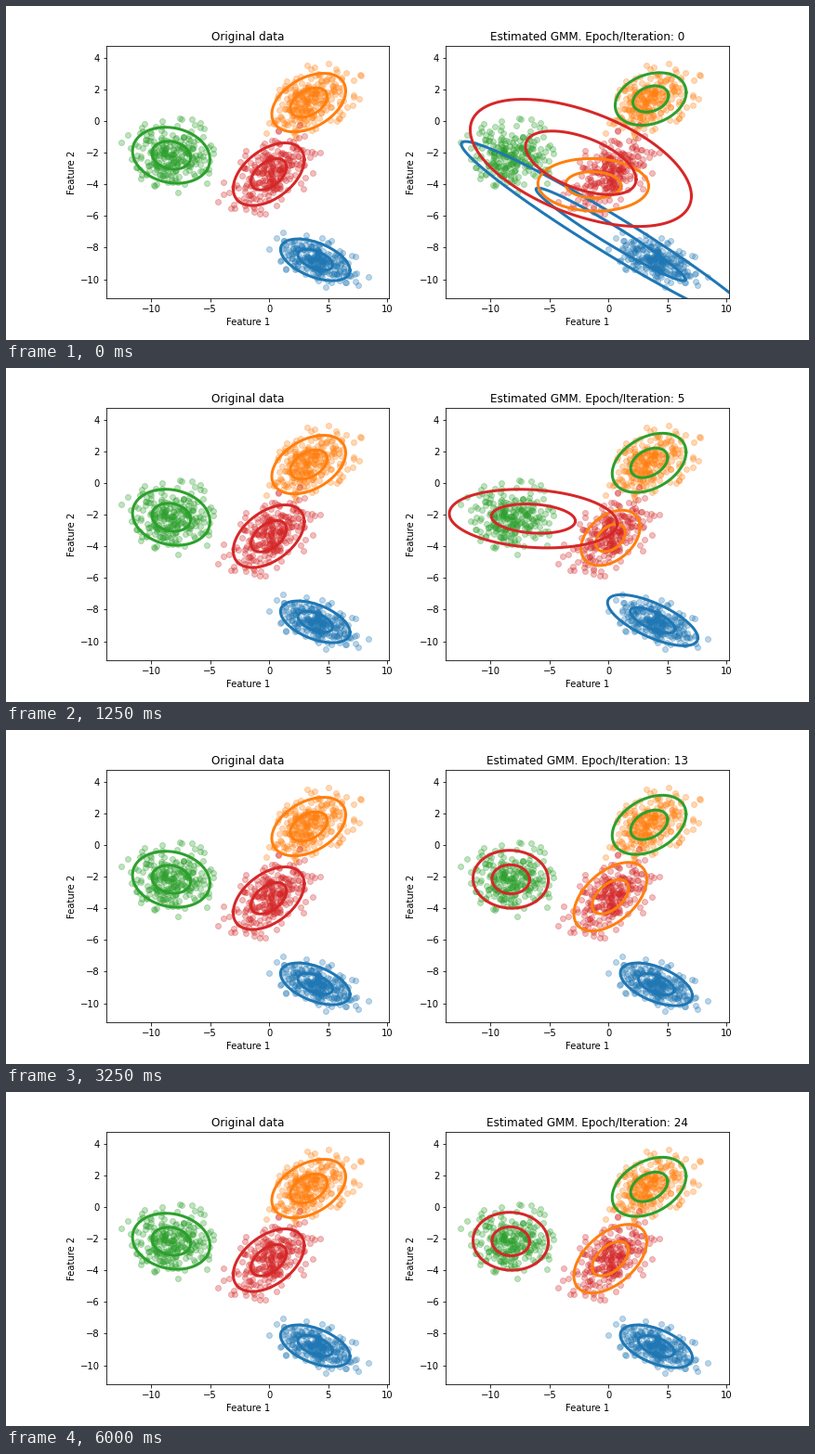
Recreate the animation shown at these times as a matplotlib script. Size 864 px wide and 360 px high, loop 6.25 s.

```python
import numpy as np
import matplotlib.pyplot as plt
from matplotlib.animation import FuncAnimation

plt.rcParams.update({"font.family": "DejaVu Sans", "font.size": 10})

EPOCHS, STEP_MS = 25, 250
XLIM, YLIM = (-13.795, 10.17), (-11.198, 4.742)
COLORS = ["C0", "C1", "C2", "C3"]
SAMPLES, MAX_SIGMA = 250, 2.9
THETA = np.linspace(0, 2 * np.pi, 241)


def gauss(cx, cy, hx, hy, rho):
    """Pose of a gaussian: centre, 2-sigma width, slant and thickness."""
    return np.array([cx, cy, hx, hy * rho, hy * np.sqrt(1 - rho**2)])


def project(pose, u, v):
    """Map unit-circle coordinates onto the 2-sigma ellipse."""
    cx, cy, hx, slant, thick = pose
    return cx + hx * u, cy + slant * u + thick * v


TRUE = [
    gauss(3.90, -8.77, 2.94, 1.32, -0.50),
    gauss(3.35, 1.17, 3.13, 1.85, 0.40),
    gauss(-8.30, -2.16, 3.28, 1.77, -0.15),
    gauss(-0.04, -3.36, 3.01, 1.98, 0.46),
]

# Initial guesses, the pauses on the way, and the converged fits
BLUE_START = gauss(0.18, -7.16, 12.67, 5.87, -0.972)
BLUE_END = gauss(4.04, -8.80, 3.05, 1.35, -0.53)
ORANGE_START = gauss(-1.30, -4.03, 4.69, 1.66, -0.05)
ORANGE_MID = gauss(0.16, -3.51, 2.36, 1.65, 0.35)
ORANGE_END = gauss(0.14, -3.26, 3.09, 2.17, 0.50)
GREEN_START = gauss(3.56, 1.40, 3.01, 1.66, 0.25)
GREEN_END = gauss(3.43, 1.28, 3.13, 1.87, 0.36)
RED_START = gauss(-2.36, -2.64, 9.37, 4.02, -0.52)
RED_MID = gauss(-5.59, -2.28, 8.74, 1.87, -0.22)
RED_END = gauss(-8.30, -2.16, 3.19, 1.83, -0.03)


def settle(t, scale, power=2):
    """Weight falling smoothly from 1 to 0 after t = 0."""
    return np.exp(-(max(t, 0) / scale) ** power)


def blend(start, end, weight):
    return end + (start - end) * weight


def fit(epoch):
    """The four estimated gaussians at an epoch."""
    early = settle(epoch, 1.4)
    orange = blend(ORANGE_MID, ORANGE_END, settle(epoch - 3, 4.3))
    red = blend(RED_MID, RED_END, settle(epoch - 3, 3.4))
    return [
        blend(BLUE_START, BLUE_END, settle(epoch, 3.55, 2.7)),
        blend(ORANGE_START, orange, early),
        blend(GREEN_START, GREEN_END, early),
        blend(RED_START, red, early),
    ]


def sample(pose, rng):
    z = rng.standard_normal((SAMPLES * 2, 2))
    z = z[np.hypot(*z.T) < MAX_SIGMA][:SAMPLES]
    z = (z - z.mean(axis=0)) / z.std(axis=0)
    return project(pose, *(z.T / 2))


def make_rings(ax):
    return [[ax.plot([], [], color=c, lw=3, solid_joinstyle="round")[0]
             for _ in range(2)] for c in COLORS]


def set_rings(pairs, poses):
    for pair, pose in zip(pairs, poses):
        for line, r in zip(pair, (0.5, 1)):
            line.set_data(*project(pose, r * np.cos(THETA), r * np.sin(THETA)))


fig, (left, right) = plt.subplots(1, 2, figsize=(12, 5), dpi=72, facecolor="white")
fig.subplots_adjust(left=0.125, right=0.9, bottom=0.125, top=0.88, wspace=0.2)

rng = np.random.default_rng(7)
blue, orange, green, red = fit(EPOCHS)
# The fit swaps the labels of the last three clusters
clouds = [sample(pose, rng) for pose in (blue, green, red, orange)]

for ax in (left, right):
    for cloud, color in zip(clouds, COLORS):
        ax.scatter(*cloud, color=color, alpha=0.3)
    ax.set_xticks(range(-10, 11, 5))
    ax.set_yticks(range(-10, 5, 2))
    ax.set(xlim=XLIM, ylim=YLIM, xlabel="Feature 1", ylabel="Feature 2")

left.set_title("Original data")
set_rings(make_rings(left), TRUE)
title = right.set_title("")
fit_rings = make_rings(right)


def update(epoch):
    set_rings(fit_rings, fit(epoch))
    title.set_text(f"Estimated GMM. Epoch/Iteration: {epoch}")
    return [title, *sum(fit_rings, [])]


anim = FuncAnimation(fig, update, frames=EPOCHS, interval=STEP_MS,
                     init_func=lambda: update(0), repeat=True,
                     repeat_delay=0, blit=False)
plt.show()
```
